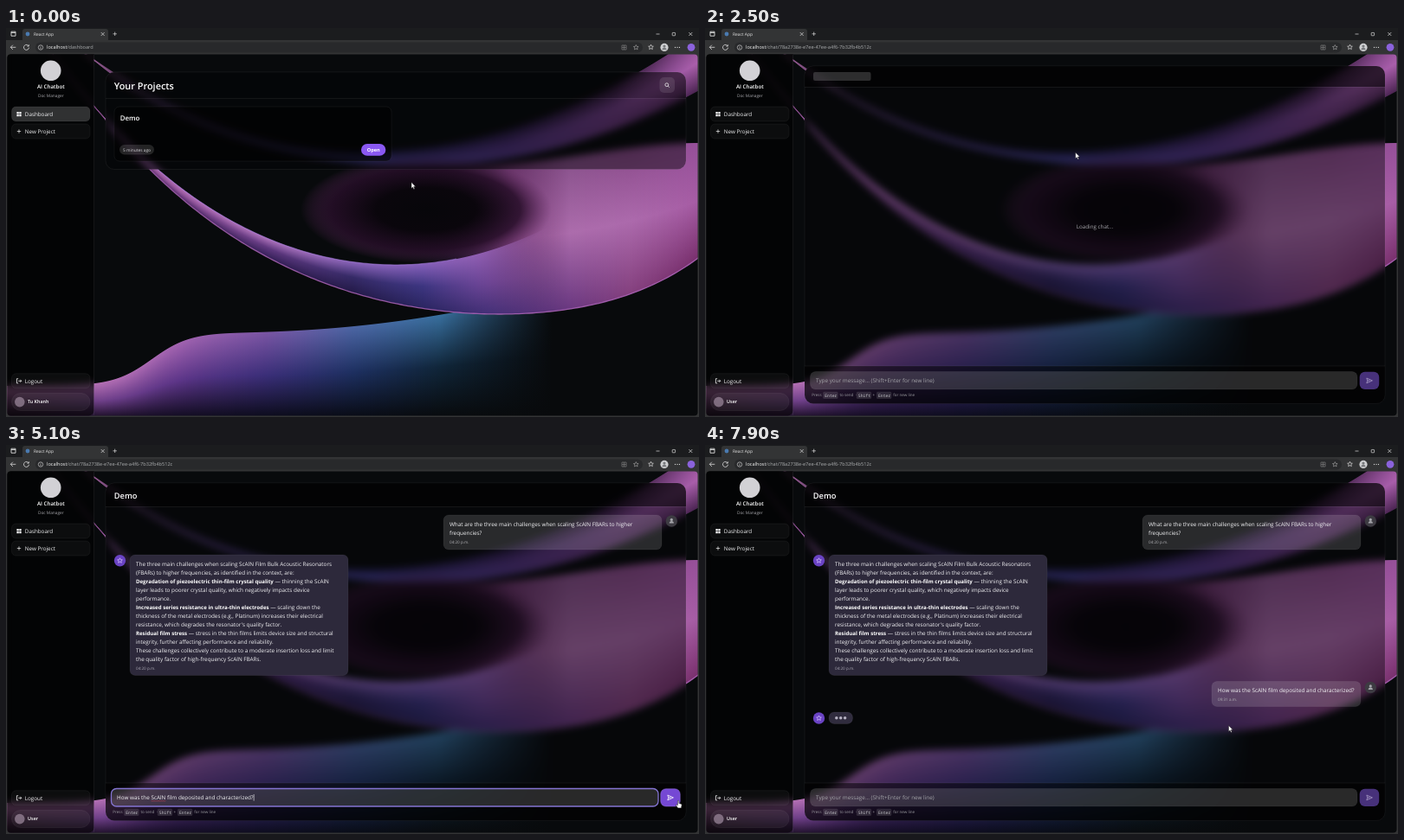
Write an HTML page with a canvas that moves like this. It is 800 px wide and 450 px high and loops after 8 s.

```html
<!DOCTYPE html>
<html lang="en">
<head>
<meta charset="utf-8">
<title>Chat demo</title>
<style>
html, body { margin: 0; width: 100%; height: 100%; overflow: hidden; background: #333; }
canvas { display: block; width: 800px; height: 450px; }
</style>
</head>
<body>
<canvas id="stage"></canvas>
<script>
const LOOP = 8000, W = 800, H = 450;
const OPENED = 2400, LOADED = 2900, FOCUS = 3700, TYPED = 4600, SENT = 5600;
const SANS = '"Open Sans", "Noto Sans", sans-serif';
const MONO = '"Noto Sans Mono", "DejaVu Sans Mono", monospace';
const QUESTION = 'How was the ScAlN film deposited and characterized?';
const EDGE = 'rgba(255,255,255,.1)';

const stage = document.getElementById('stage');
const dpr = window.devicePixelRatio || 1;
stage.width = W * dpr;
stage.height = H * dpr;
const c = stage.getContext('2d');
c.scale(dpr, dpr);
c.textRendering = 'geometricPrecision';

// ---------- helpers ----------
const smooth = u => {
  u = Math.max(0, Math.min(1, u));
  return u * u * (3 - 2 * u);
};
const rgb = hex => [1, 3, 5].map(i => parseInt(hex.slice(i, i + 2), 16));
const mix = (a, b, u) => `rgb(${rgb(a).map((v, i) => v + (rgb(b)[i] - v) * u)})`;

function layer(paint) {
  const cv = document.createElement('canvas');
  cv.width = W;
  cv.height = H;
  paint(cv.getContext('2d'));
  return cv;
}

// ---------- wallpaper ----------
// Arch with its lowest point at (cx, y): square and quartic rise on each side.
function arch(cx, y, left, left4, right, right4) {
  return x => {
    const d = x - cx;
    return d < 0 ? y - left * d ** 2 - left4 * d ** 4 : y - right * d ** 2 - right4 * d ** 4;
  };
}

// Colours from top to bottom of a band at x, blended between the nearest keys.
function shadesAt(keys, x) {
  const i = Math.max(1, keys.findIndex((k, n) => k[0] >= x || n === keys.length - 1));
  const [x0, ...a] = keys[i - 1];
  const [x1, ...b] = keys[i];
  const u = Math.max(0, Math.min(1, (x - x0) / (x1 - x0)));
  return a.map((color, n) => mix(color, b[n], u));
}

// Ribbon between two curves, one column at a time.
function band(g, from, to, top, low, keys, alpha = () => 1) {
  for (let x = from; x < to; x++) {
    const y0 = top(x), y1 = Math.max(low(x), y0 + 2);
    const shade = g.createLinearGradient(0, y0, 0, y1);
    shadesAt(keys, x).forEach((color, n, all) => shade.addColorStop(n / (all.length - 1), color));
    g.globalAlpha = alpha(x);
    g.fillStyle = shade;
    g.fillRect(x, y0, 1, y1 - y0);
  }
  g.globalAlpha = 1;
}

function rim(g, from, to, curve, color, width) {
  g.beginPath();
  for (let x = from; x <= to; x += 4) g.lineTo(x, curve(x));
  g.strokeStyle = color;
  g.lineWidth = width;
  g.stroke();
}

const upTop = arch(410, 143, .00112, 0, .0009, 0);
const upLow = arch(480, 159, .0006, 1.7e-9, .00085, 0);
const bladeTop = arch(450, 274, .00137, 1.2e-9, .00142, 0);
const bladeLow = arch(570, 331, .00083, 1.2e-9, .00087, 7e-9);
const lobeTop = x => 159 - 26 * smooth((x - 540) / 260);
const waveTop = x => 414 - 62 / (1 + Math.exp((168 - x) / 22)) - .00035 * Math.max(0, x - 260) ** 2;

function paintHollow(g) {
  g.save();
  g.translate(485, 210);
  g.scale(1, .43);
  const dark = g.createRadialGradient(0, 0, 0, 0, 0, 145);
  dark.addColorStop(0, '#07060a');
  dark.addColorStop(.4, '#0a060c');
  dark.addColorStop(.75, 'rgba(38,14,40,.85)');
  dark.addColorStop(1, 'rgba(90,40,90,0)');
  g.fillStyle = dark;
  g.fillRect(-145, -145, 290, 290);
  g.restore();
}

function paintWallpaper(g) {
  g.fillStyle = '#080a0c';
  g.fillRect(0, 0, W, H);

  band(g, 0, 640, waveTop, () => 452, [
    [0, '#b876b0', '#60385f', '#0c0810'],
    [110, '#b46fb4', '#70408a', '#140a1e'],
    [200, '#a263b0', '#5c3588', '#0e0a1c'],
    [300, '#7a55a4', '#3a2e78', '#0a0a18'],
    [400, '#4c66a4', '#1d2f60', '#080a12'],
    [500, '#386f9e', '#10263a', '#080a0c'],
    [630, '#080a0c', '#080a0c', '#080a0c']
  ]);

  band(g, 90, W, upTop, upLow, [
    [90, '#a0609a', '#a0609a', '#a0609a'],
    [160, '#241a2c', '#3a2848', '#4a3058'],
    [420, '#1a1838', '#38347c', '#4a48a4'],
    [580, '#1c1430', '#4c3078', '#543888'],
    [700, '#2a1632', '#74408a', '#663678'],
    [800, '#8c4a90', '#ac60ac', '#4a2450']
  ]);

  band(g, 470, W, lobeTop, bladeLow, [
    [500, '#2a142c', '#2c1430', '#2a1f5c'],
    [580, '#683468', '#743a72', '#452c70'],
    [650, '#87508a', '#ac6cac', '#6a3880'],
    [720, '#8a4a8a', '#ac6aac', '#84407e'],
    [800, '#96509a', '#a65ca4', '#782f6c']
  ], x => smooth((x - 470) / 120));
  paintHollow(g);

  band(g, 50, 640, bladeTop, bladeLow, [
    [60, '#4a2448', '#4a2448', '#4a2448'],
    [110, '#8a5a9a', '#8a4a88', '#7a4080'],
    [200, '#b873b8', '#94569c', '#5a2f70'],
    [300, '#b074bc', '#60387f', '#352058'],
    [400, '#8a64ba', '#352a66', '#241a48'],
    [480, '#8660ba', '#3c3580', '#2a2560'],
    [560, '#925eb0', '#74489a', '#453078'],
    [640, '#a86aae', '#9a5ea4', '#6a3a84']
  ], x => 1 - smooth((x - 540) / 100));
  rim(g, 120, 520, bladeTop, 'rgba(160,120,215,.6)', 1.2);
  rim(g, 120, W, bladeLow, 'rgba(172,100,184,.85)', 1.3);
}

const wall = layer(paintWallpaper);
const haze = layer(g => {
  g.filter = 'blur(4px)';
  g.drawImage(wall, 0, 0);
});

// ---------- drawing primitives ----------
function round(x, y, w, h, r) {
  const p = new Path2D();
  p.roundRect(x, y, w, h, r);
  return p;
}

function box(x, y, w, h, r, fill, line, width = .5) {
  const p = round(x, y, w, h, r);
  if (fill) { c.fillStyle = fill; c.fill(p); }
  if (line) { c.strokeStyle = line; c.lineWidth = width; c.stroke(p); }
}

function disc(x, y, r, fill) {
  c.fillStyle = fill;
  c.beginPath();
  c.arc(x, y, r, 0, 7);
  c.fill();
}

// Writes text centred on y and returns the x where it ends.
function text(s, x, y, size, color = '#f2f2f4', weight = 400, family = SANS) {
  c.font = `${weight} ${size}px ${family}`;
  c.fillStyle = color;
  c.fillText(s, x, y + size * .36);
  return x + c.measureText(s).width;
}

function icon(d, x, y, color = '#ddd', width = .8, fill) {
  c.save();
  c.translate(x, y);
  const p = new Path2D(d);
  if (fill) { c.fillStyle = fill; c.fill(p); }
  if (color) { c.strokeStyle = color; c.lineWidth = width; c.stroke(p); }
  c.restore();
}

function hline(x0, x1, y, color = EDGE) {
  c.fillStyle = color;
  c.fillRect(x0, y, x1 - x0, .6);
}

function tinted(path, image, tint) {
  c.save();
  c.clip(path);
  c.drawImage(image, 0, 0);
  c.fillStyle = tint;
  c.fillRect(0, 0, W, H);
  c.restore();
}

function glass(x, y, w, h, tint) {
  tinted(round(x, y, w, h, 10), haze, tint);
  box(x, y, w, h, 10, null, EDGE, .6);
}

const ring = r => `M${-r} 0a${r} ${r} 0 1 0 ${2 * r} 0a${r} ${r} 0 1 0 ${-2 * r} 0`;
const PLUS = 'M-2.2 0H2.2M0-2.2V2.2';
const CROSS = 'M-2-2L2 2M2-2L-2 2';
const STAR = 'M' + Array.from({ length: 10 }, (_, i) => {
  const r = i % 2 ? 1.4 : 3, a = i * Math.PI / 5;
  return `${r * Math.sin(a)} ${-r * Math.cos(a)}`;
}).join('L') + 'Z';

function person(x, y, color) {
  disc(x, y - 1.2, 1.6, color);
  icon('M-2.6 3q0-2.5 2.6-2.5t2.6 2.5Z', x, y, null, 0, color);
}

// ---------- browser window ----------
function drawBrowser(chat) {
  c.fillStyle = '#333435';
  c.fillRect(0, 0, W, H);
  c.fillStyle = '#1b1c1e';
  c.fillRect(0, 0, W, 14);
  box(19, 1, 99, 16, 3, '#333435');
  icon('M-2.5-2.5h5v5h-5ZM-2.5-1.2h5', 8.5, 6.7, '#ddd', .9);
  disc(25, 7, 2.4, '#4a7ab0');
  text('React App', 32, 6.8, 4.9, '#e6e6e6');
  icon(CROSS, 111.7, 7, '#ddd', .7);
  icon(PLUS, 125.7, 6.8, '#ddd', .7);
  icon('M-2 0H2', 752.5, 7, '#ddd', .7);
  box(769.2, 5.4, 3.4, 3.4, .5, null, '#ddd', .7);
  icon(CROSS, 790.3, 7, '#ddd', .7);

  icon('M3 0H-3M-.4-2.6L-3 0L-.4 2.6', 8.3, 22.3);
  icon('M2.6-1.5A3 3 0 1 0 3 .3M2.8-3.2V-1.3H.9', 23.5, 22.4);
  box(34, 16.5, 701, 12, 6, '#28292b');
  icon(ring(2.7) + 'M0-.3V1.5M0-1.5V-1', 40, 22.5, '#ccc', .7);
  const end = text('localhost', 47, 22.4, 5.6, '#f4f4f4');
  text(chat ? '/chat/78a2738e-e7ee-47ee-a4f6-7b32fb4b512c' : '/dashboard', end, 22.4, 5.6, '#a9abad');
  icon('M-2.5-2.5h5v5h-5ZM0-2.5v5M-2.5 0h5', 713.5, 22.5, '#888', .6);
  icon(STAR, 727.3, 22.5, '#aaa', .6);
  icon(STAR, 744.5, 22.2, '#ddd', .7);
  disc(760, 22.4, 4.6, '#cfd0d2');
  person(760, 22.3, '#77797c');
  for (let i = -1; i < 2; i++) disc(775 + i * 2.5, 22.4, .6, '#ddd');
  disc(791, 22.3, 4.4, '#8b62dc');

  tinted(round(1.5, 30.5, 797, 418, 4), wall, 'transparent');
}

// ---------- sidebar ----------
function navItem(label, y, active) {
  box(6.5, y - 8.5, 90.5, 17, 5, `rgba(255,255,255,${active ? .18 : .035})`, EDGE);
  text(label, 21.8, y, 6.3, '#f2f2f4', 500);
}

function drawSidebar(chat) {
  tinted(round(1.5, 30.5, 100, 418, [4, 0, 6, 4]), haze, 'rgba(0,0,0,.62)');
  c.fillStyle = EDGE;
  c.fillRect(101.2, 31, .6, 417);

  disc(51.7, 49.3, 11.8, '#d2d1d5');
  c.textAlign = 'center';
  text('AI Chatbot', 51.8, 68, 6.25, '#fff', 600);
  text('Doc Manager', 51.8, 78, 4.8, '#a6a6aa');
  c.textAlign = 'left';

  navItem('Dashboard', 99.5, !chat);
  [[12.4, 97], [15.3, 97], [12.4, 99.9], [15.3, 99.9]].forEach(([x, y]) => box(x, y, 2.4, 2.4, .3, '#f0f0f2'));
  navItem('New Project', 119.5);
  icon(PLUS, 15, 119.5, '#eee', .7);
  navItem('Logout', 408.3);
  icon('M-.8-2.6H-2.6V2.6H-.8M-.8 0H2.8M1.4-1.5L2.8 0L1.4 1.5', 15, 408.3, '#eee', .8);

  box(6.5, 422.5, 90.5, 20, 10, 'rgba(255,255,255,.05)', EDGE);
  disc(15.8, 432.6, 5.8, 'rgba(160,140,160,.7)');
  text(chat ? 'User' : 'Tu Khanh', 25, 432.5, 5.4, '#fff', 600);
}

// ---------- dashboard ----------
function drawDashboard() {
  glass(115, 51, 670, 112.5, 'rgba(4,4,6,.45)');
  box(115, 51, 670, 30, [10, 10, 0, 0], 'rgba(0,0,0,.16)');
  hline(115, 785, 81);
  text('Your Projects', 124.8, 66.6, 10.9, '#fff', 600);
  box(754.5, 57, 17.5, 18, 5, EDGE);
  icon(ring(1.9) + 'M1.4 1.4L3 3', 762.8, 65.7, '#eee', .8);

  box(125, 91, 320, 63, 6, 'rgba(0,0,0,.55)', EDGE);
  text('Demo', 131.7, 104.5, 7.9, '#fff', 600);
  box(131, 135, 40, 11.5, 5.7, 'rgba(255,255,255,.13)');
  text('5 minutes ago', 135, 140.8, 4.85, '#d4d4d8');
  box(410, 134, 28.3, 13.8, 6.9, '#8a58f2');
  text('Open', 416.8, 140.8, 5.6, '#fff', 700);
}

// ---------- chat ----------
function userBubble(x, y, h, lines, time) {
  box(x, y, 757 - x, h, 6, 'rgba(255,255,255,.14)', EDGE);
  lines.forEach((s, i) => text(s, x + 7, y + 10.5 + i * 10, 6.35));
  text(time, x + 7, y + h - 8.3, 4.6, '#b2b2b6');
  disc(768.3, y + 7, 6.7, '#3d3b42');
  person(768.3, y + 6.6, '#a4a4aa');
}

function botAvatar(y) {
  disc(131.5, y, 6.7, '#6a43c4');
  icon(STAR, 131.5, y, '#d8c8ff', .7);
}

// Text between asterisks is bold.
const ANSWER = `The three main challenges when scaling ScAlN Film Bulk Acoustic Resonators
(FBARs) to higher frequencies, as identified in the context, are:
*Degradation of piezoelectric thin-film crystal quality* — thinning the ScAlN
layer leads to poorer crystal quality, which negatively impacts device
performance.
*Increased series resistance in ultra-thin electrodes* — scaling down the
thickness of the metal electrodes (e.g., Platinum) increases their electrical
resistance, which degrades the resonator's quality factor.
*Residual film stress* — stress in the thin films limits device size and structural
integrity, further affecting performance and reliability.
These challenges collectively contribute to a moderate insertion loss and limit
the quality factor of high-frequency ScAlN FBARs.`.split('\n');

function richLine(s, x, y) {
  s.split('*').forEach((part, i) => {
    x = i % 2 ? text(part, x, y, 6.1, '#fff', 700) : text(part, x, y, 6.35);
  });
}

function drawMessages(t) {
  userBubble(505, 81, 40, ['What are the three main challenges when scaling ScAlN FBARs to higher',
    'frequencies?'], '04:20 p.m.');
  botAvatar(133.8);
  box(143, 127, 252, 139.5, 6, '#2d293b', EDGE);
  ANSWER.forEach((s, i) => richLine(s, 150, 137.6 + i * 10));
  text('04:20 p.m.', 150, 258.6, 4.6, '#aaa8b4');

  if (t < SENT) return;
  userBubble(585, 273.5, 29, [QUESTION], '09:31 a.m.');
  botAvatar(316);
  box(143, 309, 27.5, 13.5, 6, '#302c3e', EDGE);
  for (let i = -1; i < 2; i++) disc(156.7 + i * 4.9, 315.7, 1.75, '#b4b0c0');
}

function keyHint() {
  const y = 424.8, gray = '#9a9a9f';
  const key = (label, x) => {
    box(x, y - 4, 17.3, 8.2, 1.5, 'rgba(255,255,255,.12)');
    text(label, x + 2, y, 4.75, '#c8c8cc', 400, MONO);
  };
  text('Press', 123.2, y, 4.55, gray);
  key('Enter', 136.2);
  text('to send  ·', 155.5, y, 4.55, gray);
  key('Shift', 174.8);
  text('+', 193.5, y, 4.55, gray);
  key('Enter', 198);
  text('for new line', 217.2, y, 4.55, gray);
}

function drawComposer(t) {
  const focus = t >= FOCUS && t < SENT;
  const part = focus ? Math.min(1, (t - FOCUS) / (TYPED - FOCUS)) : 0;
  const typed = QUESTION.slice(0, Math.round(part * QUESTION.length));
  box(121.5, 397.5, 631.5, 20.5, 6, 'rgba(255,255,255,.15)', focus ? '#8474d2' : EDGE, focus ? 1.3 : .5);
  if (typed) {
    const end = text(typed, 128, 407.8, 6.35);
    const [before] = typed.split('ScAlN');
    if (before !== typed) {
      const left = 128 + c.measureText(before).width;
      hline(left, left + c.measureText('ScAlN').width, 411.6, 'rgba(220,70,80,.75)');
    }
    c.fillStyle = '#fff';
    c.fillRect(end + .2, 404, .6, 7.6);
  } else {
    text('Type your message... (Shift+Enter for new line)', 128, 407.8, 6.35, '#a3a3a8');
  }
  box(755.7, 397.8, 22.5, 20.2, 6, typed ? '#7548d4' : '#47317a', typed ? '#9a78e8' : null);
  icon('M-3.2-2.9L3.4 0L-3.2 2.9L-2.2 0ZM-2.2 0H.6', 767, 407.9, typed ? '#fff' : '#a99bc6', .8);
  keyHint();
}

function drawChat(t) {
  const loaded = t >= LOADED;
  const head = loaded ? 71 : 68;
  glass(115, 44, 670, 390.5, 'rgba(3,3,6,.42)');
  box(115, 44, 670, head - 44, [10, 10, 0, 0], 'rgba(0,0,0,.5)');
  box(115, 391, 670, 43.5, [0, 0, 10, 10], 'rgba(0,0,0,.5)');
  hline(115, 785, head);
  hline(115, 785, 390.7);
  if (loaded) {
    text('Demo', 124.8, 58.4, 9.3, '#fff', 600);
    drawMessages(t);
  } else {
    box(125, 51, 66.5, 10, 2, 'rgba(255,255,255,.17)');
    text('Loading chat...', 428.8, 229.8, 6.25, '#a5a5aa');
  }
  drawComposer(t);
}

// ---------- pointer ----------
const MOVES = [
  { at: 2000, time: 300, x: 427.7, y: 144 },
  { at: 2900, time: 500, x: 474, y: 408 },
  { at: 4600, time: 400, x: 776, y: 411.5 },
  { at: 5600, time: 500, x: 604.5, y: 324.5 }
];

function drawPointer(t) {
  let x = 468, y = 178.5;
  for (const m of MOVES) {
    const u = smooth((t - m.at) / m.time);
    x += (m.x - x) * u;
    y += (m.y - y) * u;
  }
  const within = (l, top, r, b) => x > l && x < r && y > top && y < b;
  if (t >= LOADED && within(121, 397, 753, 418)) {
    icon('M-1.2-3.4H1.2M0-3.4V3.4M-1.2 3.4H1.2', x, y, '#0b0b0c', .7);
  } else if (t < OPENED ? within(410, 134, 438, 148) : t < SENT && within(755, 397, 778, 418)) {
    icon('M0 0q.7-.6 1.3.1V3l2.6.8q.8.3.7 1.2L4 8.4H.2L-2 5.4q-.3-1 .8-.9L-.1 5.4V.5Z', x - .5, y, '#111', .5, '#fff');
  } else {
    icon('M0 0V7L1.6 5.5L2.7 8L3.8 7.5L2.7 5.1H4.8Z', x, y, '#111', .4, '#fff');
  }
}

function frame() {
  const t = Math.floor(performance.now() % LOOP / 100) * 100;
  const chat = t >= OPENED;
  drawBrowser(chat);
  drawSidebar(chat);
  if (chat) drawChat(t); else drawDashboard();
  drawPointer(t);
  requestAnimationFrame(frame);
}
frame();
</script>
</body>
</html>
```
